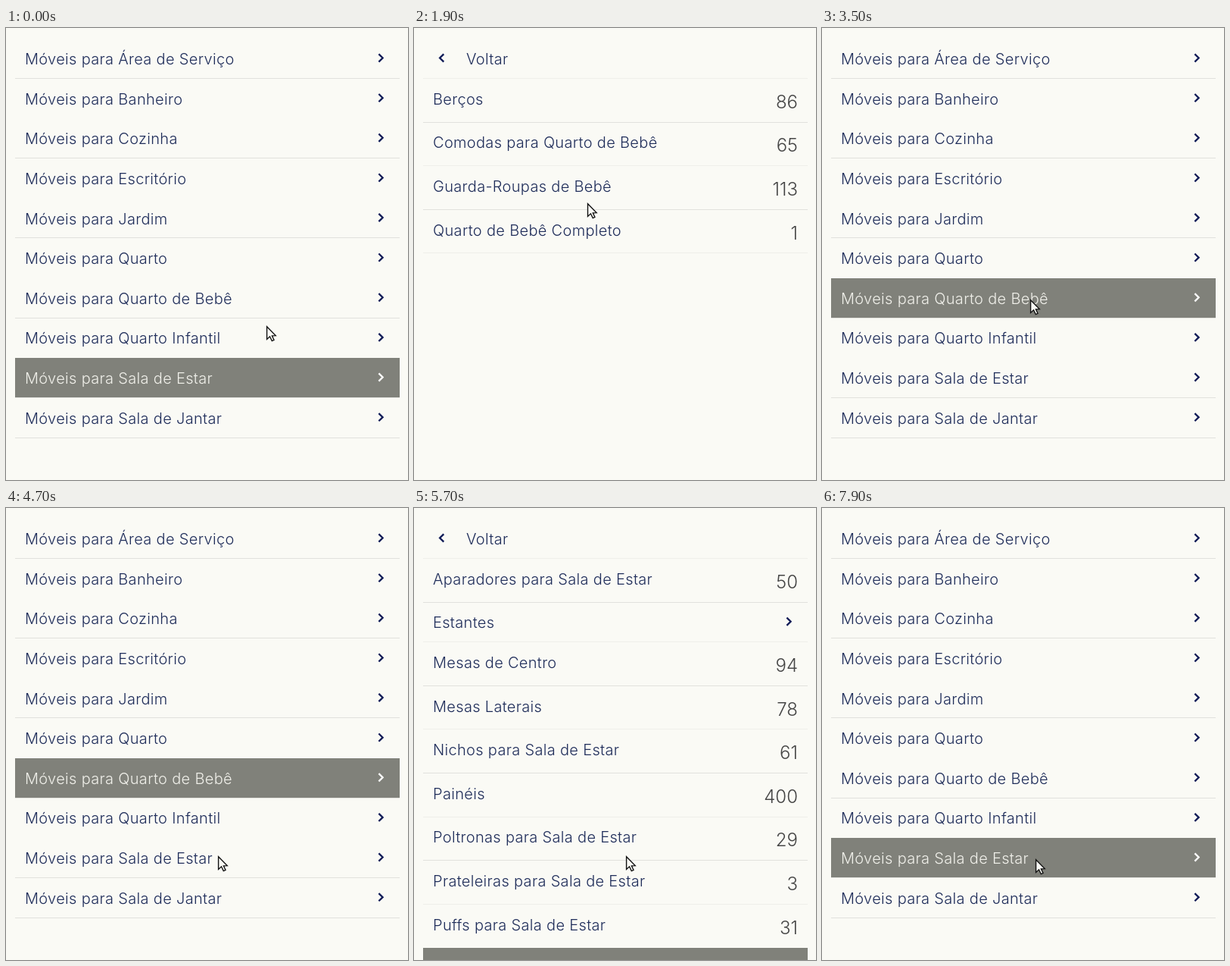
An HTML page with a canvas for the animation above (8 s loop, 531 by 596 pixels).

```html
<!DOCTYPE html>
<html lang="pt">
<head>
<meta charset="utf-8">
<title>Menu de móveis</title>
<style>
  html, body { margin: 0; width: 100%; height: 100%; overflow: hidden; background: #fafaf5; }
  canvas { display: block; }
</style>
</head>
<body>
<canvas id="stage" width="531" height="596"></canvas>
<script>
const ctx = document.getElementById('stage').getContext('2d');
const LOOP = 8000, STEP = 100, SLIDE = 200;
const LEFT = 12, WIDTH = 508, TOP = 13.8, ROW = 52.63, COUNT_ROW = 57.63;
const BG = '#fafaf5', NAVY = '#1f2d5a', ARROW = '#0d1a56', GREY = '#454545';
const ACTIVE = '#80817a', PALE = '#f0f0ea', FAINT = '#efefea', STRONG = '#e1e1dd';

// Rows are "label" (opens a submenu) or "label|count".
const main = ['Área de Serviço', 'Banheiro', 'Cozinha', 'Escritório', 'Jardim', 'Quarto', 'Quarto de Bebê',
  'Quarto Infantil', 'Sala de Estar', 'Sala de Jantar'].map(name => 'Móveis para ' + name);
const baby = ['Berços|86', 'Comodas para Quarto de Bebê|65', 'Guarda-Roupas de Bebê|113',
  'Quarto de Bebê Completo|1'];
const living = ['Aparadores para Sala de Estar|50', 'Estantes', 'Mesas de Centro|94', 'Mesas Laterais|78',
  'Nichos para Sala de Estar|61', 'Painéis|400', 'Poltronas para Sala de Estar|29',
  'Prateleiras para Sala de Estar|3', 'Puffs para Sala de Estar|31', 'Racks'];

const visits = [
  { list: baby, from: 'Móveis para Quarto de Bebê', open: 1260, close: 3200 },
  { list: living, from: 'Móveis para Sala de Estar', open: 5400, close: 7100 }
];

// Pointer stops: leave the previous one, arrive, x, y
const stops = [
  [0, 0, 344, 393], [500, 700, 297, 355], [1600, 2300, 124, 40], [3000, 3100, 139, 49],
  [3100, 3500, 275, 358], [3600, 3800, 284, 392], [4000, 4700, 280, 459], [5700, 6400, 100, 45],
  [6700, 6900, 356, 273], [7000, 7100, 375, 393], [7100, 7300, 388, 535], [7500, 7900, 282, 463]
];

const progress = (t, start, end) => Math.max(0, Math.min(1, (t - start) / (end - start || 1)));
const smooth = v => v * v * (3 - 2 * v);
const easeOut = v => 1 - (1 - v) ** 2;

function text(string, x, y, color, size = 20, align = 'left') {
  ctx.font = `300 ${size}px Inter, "Open Sans", sans-serif`;
  ctx.letterSpacing = size === 20 ? '0.32px' : '0px';
  ctx.textAlign = align;
  ctx.fillStyle = color;
  ctx.fillText(string, x, y);
}

function chevron(x, y, dir, color) {
  ctx.beginPath();
  for (const side of [-1, 0, 1]) ctx.lineTo(x + dir * (side ? -2.6 : 2.6), y + side * 5.1);
  ctx.strokeStyle = color;
  ctx.lineWidth = 2.3;
  ctx.stroke();
}

function box(x, top, height, color) {
  ctx.fillStyle = color;
  ctx.fillRect(x, top, WIDTH, height);
}

function drawList(list, shift, header, active) {
  const x = LEFT + shift;
  let y = TOP + (header ? ROW : 0);
  list.forEach((row, i) => {
    const [label, count] = row.split('|');
    const bottom = y + (count ? COUNT_ROW : ROW);
    const on = row === active;
    // Hairlines alternate in strength; the weak ones vanish while the header is hidden.
    const strong = i % 2 === 0 || (!header && i === list.length - 1);
    if (strong || header) box(x, Math.floor(bottom), 1, strong ? STRONG : FAINT);
    if (on) box(x, Math.round(y), Math.round(bottom) - Math.round(y), ACTIVE);
    text(label, x + 13, y + 34.2, on ? PALE : NAVY);
    if (count) text(count, x + 495, y + 39.2, GREY, 24, 'right');
    else chevron(x + 483, y + 25.7, 1, on ? '#fff' : ARROW);
    y = bottom;
  });
}

function pointerAt(t) {
  let x = 0, y = 0;
  for (const [leave, arrive, toX, toY] of stops) {
    const k = arrive ? smooth(progress(t, leave, arrive)) : 1;
    x += (toX - x) * k;
    y += (toY - y) * k;
  }
  return [x, y];
}

function drawPointer(x, y) {
  ctx.save();
  ctx.translate(x + 0.6, y + 0.8);
  ctx.beginPath();
  [[0, 0], [0, 16.6], [3.9, 13], [6.7, 18.8], [9.4, 17.5], [6.8, 12], [11.6, 11.8]]
    .forEach(point => ctx.lineTo(...point));
  ctx.closePath();
  ctx.fillStyle = BG;
  ctx.fill();
  ctx.strokeStyle = '#111';
  ctx.lineWidth = 1.4;
  ctx.stroke();
  ctx.restore();
}

function draw(t) {
  // Before the first visit the last visited row is still marked.
  const visit = visits.filter(v => v.open <= t).pop() || visits[1];
  const header = t >= visit.open && t < visit.close;
  const opened = easeOut(progress(t, visit.open, visit.open + SLIDE));
  const closed = easeOut(progress(t, visit.close, visit.close + SLIDE));
  const shift = WIDTH * (closed ? 1 - closed : opened);

  ctx.fillStyle = BG;
  ctx.fillRect(0, 0, 531, 596);
  ctx.save();
  ctx.beginPath();
  ctx.rect(LEFT, 0, WIDTH, 596);
  ctx.clip();
  if (header) {
    chevron(36.7, 39.5, -1, ARROW);
    text('Voltar', 69, 48, NAVY);
    box(LEFT, Math.floor(TOP + ROW), 1, FAINT);
  }
  drawList(main, -shift, header, visit.from);
  drawList(visit.list, WIDTH - shift, header, 'Racks');
  ctx.restore();
  drawPointer(...pointerAt(t));
}

// Motion advances ten times a second.
function frame() {
  draw(Math.floor(performance.now() % LOOP / STEP) * STEP);
  requestAnimationFrame(frame);
}
frame();
</script>
</body>
</html>
```
